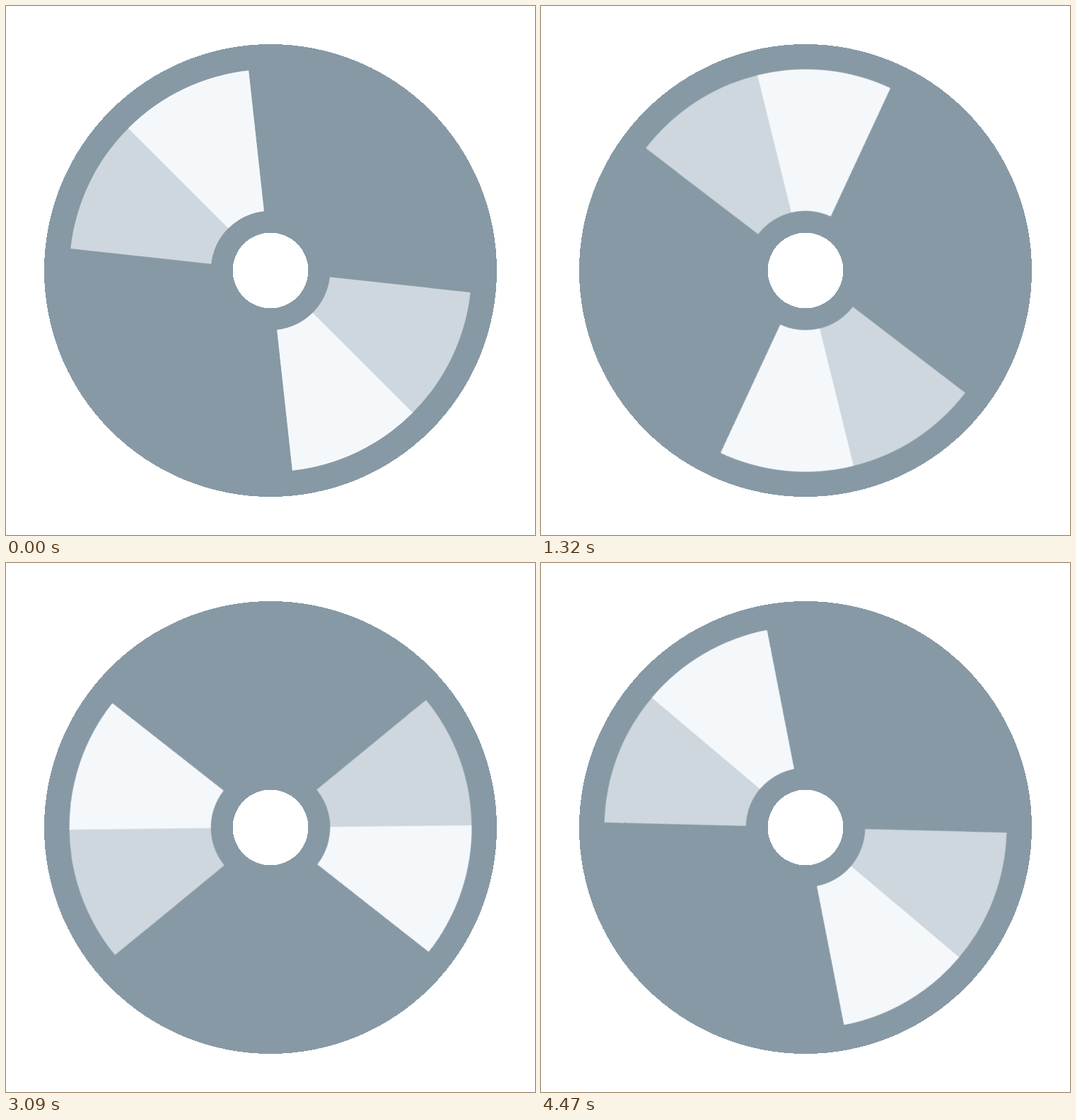
An HTML page for the animation above (4.5 s loop, 748 by 748 pixels).

```html
<!DOCTYPE html>
<html lang="en">
<head>
<meta charset="utf-8">
<title>Spinning disc</title>
<style>
  html, body { margin: 0; width: 100%; height: 100%; overflow: hidden; background: #fff; }
  svg { display: block; width: 748px; height: 748px; }
  .crisp { shape-rendering: crispEdges; }
</style>
</head>
<body>
<svg viewBox="-374 -374 748 748">
  <circle class="crisp" r="320" fill="#8799a5"/>
  <g id="shine"></g>
  <circle class="crisp" r="53.4" fill="#fff"/>
</svg>
<script>
  const LOOP = 4500, STEP = 30, TURNS = 2;
  const OUTER = 284.4, INNER = 84.4;
  const shine = document.getElementById('shine');

  // Angles are in degrees, clockwise from the top.
  function point(radius, angle) {
    const a = angle * Math.PI / 180;
    return `${(radius * Math.sin(a)).toFixed(3)} ${(-radius * Math.cos(a)).toFixed(3)}`;
  }

  function addWedge(from, to, fill) {
    const path = document.createElementNS('http://www.w3.org/2000/svg', 'path');
    path.setAttribute('d',
      `M${point(INNER, from)}L${point(OUTER, from)}` +
      `A${OUTER} ${OUTER} 0 0 1 ${point(OUTER, to)}` +
      `L${point(INNER, to)}A${INNER} ${INNER} 0 0 0 ${point(INNER, from)}Z`);
    path.setAttribute('fill', fill);
    shine.append(path);
  }

  for (const side of [0, 180]) {
    addWedge(side - 83.75, side - 6.25, '#cdd7dd');
    addWedge(side - 45, side - 6.25, '#f5f8fb');
  }

  shine.animate(
    [{ transform: 'rotate(0deg)' }, { transform: `rotate(${360 * TURNS}deg)` }],
    { duration: LOOP, iterations: Infinity, easing: `steps(${LOOP / STEP}, end)` }
  );
</script>
</body>
</html>
```
